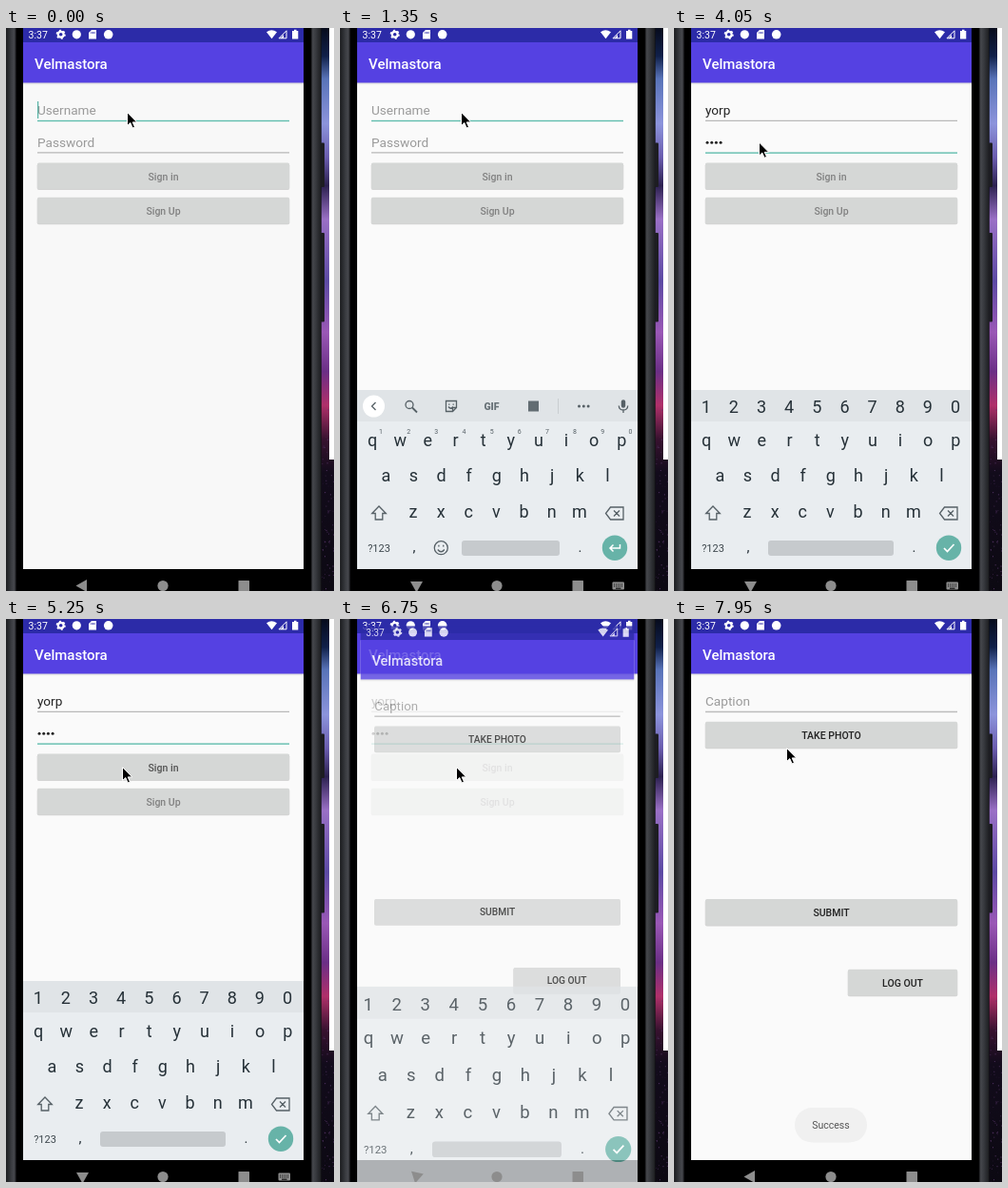
Animation of 345 by 591 pixels, one loop 8000 ms. Source, as an HTML page:

```html
<!DOCTYPE html>
<html lang="en">
<head>
<meta charset="utf-8">
<title>Sign in</title>
<style>
html, body { margin: 0; width: 100%; height: 100%; overflow: hidden; background: #000; }
svg { display: block; width: 345px; height: 591px; font-family: Roboto, sans-serif; }
.mid { text-anchor: middle; }
.btn { font-size: 10.5px; font-weight: 500; text-anchor: middle; }
.field { font-size: 13.6px; }
.hint { fill: #9a9a9a; }
.key { font-size: 18px; fill: #263138; text-anchor: middle; }
.line { fill: none; stroke: #566066; stroke-width: 1.3; }
</style>
</head>
<body>
<svg viewBox="0 0 345 591" xmlns="http://www.w3.org/2000/svg">
  <defs>
    <linearGradient id="wall" x1="0" y1="0" x2="0" y2="1">
      <stop offset="0" stop-color="#070b1c"/><stop offset=".05" stop-color="#10204a"/>
      <stop offset=".09" stop-color="#5873b8"/><stop offset=".17" stop-color="#8c94dc"/>
      <stop offset=".23" stop-color="#6a5cae"/><stop offset=".28" stop-color="#2c2150"/>
      <stop offset=".34" stop-color="#9a70c6"/><stop offset=".45" stop-color="#5c4aa4"/>
      <stop offset=".54" stop-color="#9a58b6"/><stop offset=".61" stop-color="#6b2f86"/>
      <stop offset=".67" stop-color="#b0306a"/><stop offset=".73" stop-color="#38122f"/>
      <stop offset=".79" stop-color="#120b1b"/><stop offset="1" stop-color="#0c0912"/>
    </linearGradient>
    <linearGradient id="edgeL">
      <stop offset="0" stop-color="#1c1d20"/><stop offset=".3" stop-color="#2c2e32"/>
      <stop offset=".55" stop-color="#3c3e43"/><stop offset=".8" stop-color="#45474c"/>
      <stop offset="1" stop-color="#08080a"/>
    </linearGradient>
    <linearGradient id="edgeR">
      <stop offset="0" stop-color="#08080a"/><stop offset=".2" stop-color="#45474c"/>
      <stop offset=".5" stop-color="#37393e"/><stop offset="1" stop-color="#1c1d20"/>
    </linearGradient>
    <linearGradient id="drop" x1="0" y1="0" x2="0" y2="1">
      <stop offset="0" stop-opacity=".13"/><stop offset="1" stop-opacity="0"/>
    </linearGradient>
    <clipPath id="screen"><rect id="clip" x="18" width="295" height="568"/></clipPath>
    <g id="bar">
      <rect x="18" width="295" height="15.5" fill="#2c2ba8"/>
      <rect x="18" y="15" width="295" height="42.5" fill="#5541e2"/>
      <rect x="18" y="57.5" width="295" height="2.5" fill="url(#drop)"/>
      <text x="30" y="42.7" font-size="15" font-weight="500" fill="#fff">Velmastora</text>
      <g fill="#fff">
        <text x="23.6" y="10.6" font-size="10.5">3:37</text>
        <circle cx="57.7" cy="6.7" r="2.9" fill="none" stroke="#fff" stroke-width="2.2"/>
        <circle cx="57.7" cy="6.7" r="4.3" fill="none" stroke="#fff" stroke-width="1.5" stroke-dasharray="2 2.5"/>
        <circle cx="74.3" cy="6.8" r="4.6"/>
        <path d="M87 5 L90 2 H95 V11.5 H87Z"/>
        <path d="M89.8 4V6 M91.5 4V6 M93.2 4V6" stroke="#2c2ba8" stroke-width=".8"/>
        <circle cx="107.7" cy="6.8" r="4.8"/>
        <path d="M274 4.3 Q279.3 .3 285 4.3 L279.5 11.3Z"/>
        <path d="M287 10.8 L295 2.8 V10.8Z" fill="none" stroke="#fff"/>
        <path d="M288.5 10.8 L292 7 V10.8Z"/>
        <path d="M301 3 H303 V1.8 H305.5 V3 H307.3 V11.6 H301Z"/>
      </g>
    </g>
  </defs>

  <rect width="345" height="591" fill="url(#wall)"/>
  <g id="stars"></g>
  <rect x="340" width="5" height="453" fill="#fff"/>
  <rect width="331.5" height="591" fill="#000"/>
  <rect width="11" height="591" fill="url(#edgeL)"/>
  <rect x="320.5" width="11" height="591" fill="url(#edgeR)"/>
  <rect x="331" y="120.5" width="4" height="46.5" rx="1" fill="#1d1d22"/>
  <rect x="331" y="215" width="4" height="93.5" rx="1" fill="#1d1d22"/>

  <g clip-path="url(#screen)">
    <g id="login">
      <rect id="paper" x="18" y="15" width="295" height="553"/>
      <use href="#bar"/>
      <text id="user" class="field" x="33" y="91.3"></text>
      <rect id="userLine" x="33" y="96.8" width="265"/>
      <text id="passHint" class="field hint" x="33" y="125">Password</text>
      <g id="dots" fill="#222"></g>
      <rect id="passLine" x="33" y="130.4" width="265"/>
      <rect id="caret" width="1.2" height="18" fill="#58b3a5"/>
    </g>
    <g id="page">
      <rect x="18" y="15" width="295" height="553" fill="#fafafa"/>
      <use href="#bar"/>
      <text class="field hint" x="33" y="91.3">Caption</text>
      <rect id="capLine" x="33" y="96.7" width="265"/>
    </g>
    <g id="board">
      <rect x="18" y="380" width="295" height="34" fill="#e0e4e7"/>
      <rect x="18" y="413" width="295" height="190" fill="#e9edf0"/>
      <g id="keys"></g>
      <path class="line" d="M41 502 L48.3 509.5 H44.8 V516 H37.2 V509.5 H33.7Z"/>
      <path class="line" d="M284.5 503 H298 V516 H284.5 L279.5 509.5Z M288 506.5 L294 512.5 M294 506.5 L288 512.5"/>
      <text class="mid" x="41" y="550" font-size="11" fill="#3c464c">?123</text>
      <text class="key" x="78" y="550" style="font-size:15px">,</text>
      <text class="key" x="252.5" y="550" style="font-size:15px">.</text>
      <rect id="space" y="538" height="16" rx="3" fill="#c6cacd"/>
      <circle cx="289" cy="545.7" r="13.2" fill="#67b3a8"/>
      <g id="textMode">
        <circle cx="35.5" cy="397" r="11.5" fill="#fff"/>
        <path class="line" d="M37.5 393 L33.5 397 L37.5 401"/>
        <circle class="line" cx="73" cy="395.5" r="4"/>
        <path class="line" d="M76 398.5 L81 403.5" style="stroke-width:1.8"/>
        <path class="line" d="M111.5 391.5 H122.5 V398.5 L118.5 402.5 H111.5Z M122.5 398.5 H118.5 V402.5 M114 397.5 Q116.5 401 119 397.5"/>
        <path class="line" d="M114.8 394.5V395.8 M119.2 394.5V395.8"/>
        <text class="mid" x="159.5" y="400.6" font-size="10.5" font-weight="900" fill="#667076">GIF</text>
        <rect x="198" y="391.5" width="11" height="11" fill="#626c72"/>
        <path d="M229.5 389 V405" stroke="#c9ced1"/>
        <g fill="#566066">
          <circle cx="251.5" cy="397" r="1.5"/><circle cx="256.3" cy="397" r="1.5"/><circle cx="261.1" cy="397" r="1.5"/>
          <rect x="295.8" y="390.3" width="4.4" height="8.5" rx="2.2"/>
        </g>
        <path class="line" d="M293.3 396.5 Q293.5 401 298 401 Q302.5 401 302.7 396.5 M298 401V404"/>
        <circle class="line" cx="106.3" cy="545.7" r="7"/>
        <path class="line" d="M102.8 547.5 Q106.3 552 109.8 547.5 M103.9 542.7V544.5 M108.7 542.7V544.5"/>
        <path d="M294.5 542 V546 H284 M287.5 542.5 L284 546 L287.5 549.5" fill="none" stroke="#fff" stroke-width="1.5"/>
      </g>
      <path id="tick" d="M284 546 L287.5 549.5 L294.5 542" fill="none" stroke="#fff" stroke-width="1.7"/>
    </g>
    <g id="toast">
      <rect x="127" y="513" width="76" height="36.5" rx="18.25" fill="#f0f0f0"/>
      <text class="mid" x="165" y="535.3" font-size="10.5" fill="#555">Success</text>
    </g>
  </g>

  <g fill="#8d8d8d">
    <path id="back" d="M-7 0 L4.5 -6.5 V6.5Z"/>
    <circle cx="165" cy="585.5" r="5.6"/>
    <rect x="244.5" y="580" width="11.5" height="11.5" rx=".5"/>
    <g id="kbIcon">
      <rect x="286.5" y="581.5" width="12.5" height="8" rx="1"/>
      <path d="M288 584H298 M288 586H298" stroke="#000" stroke-dasharray="1 1"/>
      <path d="M290 588.2H295.5" stroke="#000"/>
    </g>
  </g>
  <path id="mouse" d="M0 0 V14 L3.3 11 L5.6 16.3 L8 15.3 L5.7 10.3 H10.2Z" fill="#000" stroke="#fff" stroke-linejoin="round"/>
</svg>

<script>
const NS = 'http://www.w3.org/2000/svg';
const $ = id => document.getElementById(id);
const set = (el, attrs) => { for (const k in attrs) el.setAttribute(k, attrs[k]); return el; };
const add = (parent, tag, attrs, text = '') => {
  const el = set(document.createElementNS(NS, tag), attrs);
  el.textContent = text;
  return parent.appendChild(el);
};
const show = (el, on) => set(el, { visibility: on ? 'visible' : 'hidden' });

function button(parent, x, y, w, label, color) {
  add(parent, 'rect', { x: x - .3, y: y + .7, width: w + .6, height: 27.7, rx: 2, fill: '#000', opacity: .16 });
  add(parent, 'rect', { x, y, width: w, height: 27.6, rx: 1.5, fill: '#d5d7d6' });
  return add(parent, 'text', { class: 'btn', x: x + w / 2, y: y + 17.9, fill: color }, label);
}
const signIn = button($('login'), 33, 141.6, 265, 'Sign in', '#808080');
button($('login'), 33, 177.8, 265, 'Sign Up', '#808080');
button($('page'), 33, 107.8, 265, 'TAKE PHOTO', '#222');
button($('page'), 33, 294, 265, 'SUBMIT', '#222');
button($('page'), 183, 367.8, 115, 'LOG OUT', '#222');

function keyRow(parent, chars, x, y) {
  [...chars].forEach((c, i) => add(parent, 'text', { class: 'key', x: x + i * 29.15, y }, c));
}
keyRow($('keys'), 'qwertyuiop', 34, 438.5);
keyRow($('keys'), 'asdfghjkl', 48.3, 476);
keyRow($('keys'), 'zxcvbnm', 77, 514);
const digits = add($('board'), 'g', {});
keyRow(digits, '1234567890', 33.7, 404);
[...'1234567890'].forEach((c, i) =>
  add($('textMode'), 'text', { class: 'mid', x: 43 + i * 29.15, y: 426, 'font-size': 7, fill: '#566066' }, c));
for (let i = 0; i < 4; i++) add($('dots'), 'circle', { cx: 35 + i * 4.7, cy: 120.3, r: 1.5 });

// sparse specks on the dark part of the wallpaper
let seed = 7;
const rnd = () => (seed = seed * 16807 % 2147483647) / 2147483647;
for (let i = 0; i < 90; i++)
  add($('stars'), 'rect', { x: 332 + rnd() * 13, y: 400 + rnd() * 191, width: 1, height: 1, fill: '#5b3a6e', opacity: rnd() });

const LOOP = 8000, STEP = 150;
const steps = {
  name: [[0, ''], [2100, 'y'], [2250, 'yo'], [2400, 'yor'], [2550, 'yorp']],
  dots: [[0, 0], [3300, 1], [3450, 3], [3600, 4]],
  caret: [[0, 1], [150, 0], [600, 1], [1050, 0], [1500, 1], [4050, 0], [4500, 1], [5100, 0]],
  mouse: [[0, [127.5, 88.6]], [2700, [100, 110]], [2850, [89.5, 120]], [4350, [96, 127]],
    [4500, [108, 142]], [4650, [119, 152]], [4800, [122.5, 155.6]], [7950, [118.5, 135.6]]],
  press: [[0, '#808080'], [5100, '#686868'], [5250, '#525252'], [5550, '#6c6c6c'], [5700, '#808080']],
  // opacity, shift down, scale
  board: [[0, [0, 0, 1]], [900, [.25, 70, 1]], [1050, [.75, 28, 1]], [1200, [1, 6, 1]], [1350, [1, 0, 1]],
    [6750, [.75, 0, 1.03]], [6900, [.33, 0, 1.052]], [7050, [0, 0, 1.06]]],
  // opacity, scale
  page: [[0, [0, .9]], [6750, [.8, .975]], [6900, [1, .998]], [7050, [1, 1]]],
  toast: [[0, 0], [6900, .6], [7050, 1]],
  back: [[0, 0], [900, -30], [1050, -70], [1200, -90], [6750, -78], [6900, -45], [7050, 0]]
};
const at = (key, t) => steps[key].filter(s => s[0] <= t).pop()[1];
const zoom = (s, x, y) => `translate(${x} ${y}) scale(${s}) translate(${-x} ${-y})`;

function render(t) {
  const name = at('name', t), dots = at('dots', t), inPass = t >= 2850, leaving = t >= 6750;
  const focused = { height: 1.4, fill: '#62bdae' }, idle = { height: 1, fill: '#a8a8a8' };

  set($('paper'), { fill: t < 900 ? '#f8f8f8' : '#fafafa' });
  $('user').textContent = name || 'Username';
  set($('user'), { fill: name ? '#222' : '#9a9a9a' });
  set($('userLine'), inPass ? idle : focused);
  set($('passLine'), inPass ? focused : idle);
  show($('passHint'), !dots);
  [...$('dots').children].forEach((d, i) => set(d, { opacity: i < dots ? 1 : 0 }));
  const caretX = inPass ? (dots ? 35.3 + dots * 4.7 : 33)
    : 33 + (name ? $('user').getComputedTextLength() : 0);
  set($('caret'), { x: caretX, y: inPass ? 111 : 77, opacity: at('caret', t) });
  set(signIn, { fill: at('press', t) });

  const [pageAlpha, pageScale] = at('page', t);
  set($('page'), { opacity: pageAlpha, transform: zoom(pageScale, 165.5, 295) });
  show($('login'), pageAlpha < 1);
  set($('capLine'), t < 7050 ? { height: 1, fill: '#999' } : { height: 1.5, fill: '#bcbcbc' });

  const [alpha, dy, scale] = at('board', t);
  set($('board'), { opacity: alpha, transform: `translate(0 ${dy}) ` + zoom(scale, 165.5, 185) });
  set($('clip'), { height: leaving ? 591 : 568 });
  show($('textMode'), !inPass);
  show($('tick'), inPass);
  show(digits, inPass);
  set($('space'), inPass ? { x: 99, width: 132 } : { x: 128, width: 103 });

  set($('toast'), { opacity: at('toast', t) });
  set($('back'), { transform: `translate(80.5 585.5) rotate(${at('back', t)})` });
  show($('kbIcon'), t >= 1050 && !leaving);
  set($('mouse'), { transform: `translate(${at('mouse', t)})` });
}

const start = performance.now();
function tick() {
  const t = (performance.now() - start) % LOOP;
  render(Math.floor(t / STEP) * STEP);
  requestAnimationFrame(tick);
}
tick();
</script>
</body>
</html>
```
